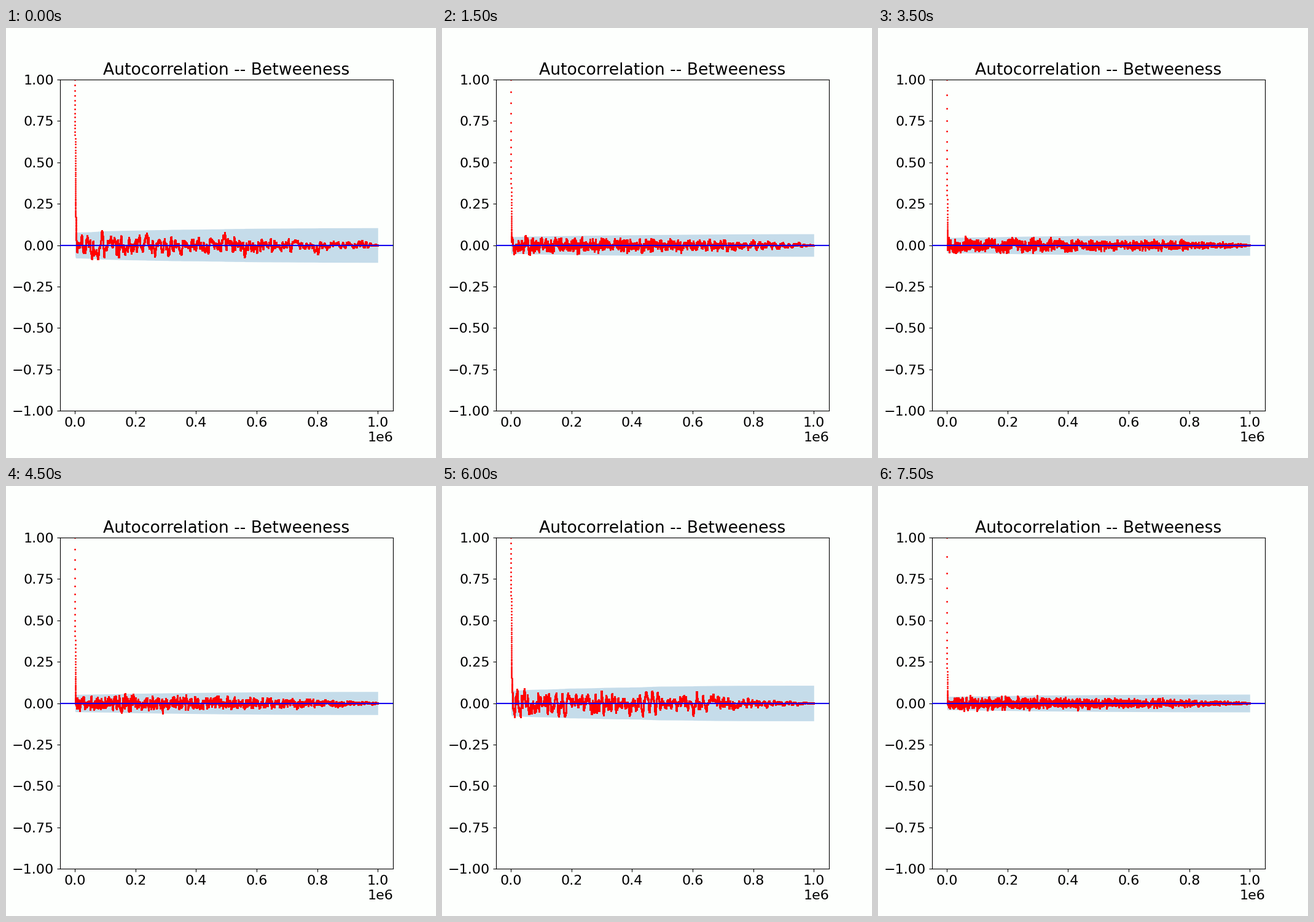
A matplotlib script for the animation above (8 s loop, 700x700 px).

```python
import numpy as np
import matplotlib.pyplot as plt
from matplotlib.animation import FuncAnimation

N = 20000            # samples per chain
STEP = 50            # iterations between samples
STRETCH = 0.98       # slightly slower than exponential decay
PAPER = "#fdfffd"

# Lag-one correlation of each chain
RHO = [0.966, 0.951, 0.943, 0.925, 0.958, 0.940, 0.921, 0.907,
       0.958, 0.931, 0.902, 0.887, 0.966, 0.926, 0.902, 0.885]

lags = np.arange(N)
x = lags * STEP


def sample_acf(rho, rng):
    """Autocorrelation of a simulated AR(1) chain at every lag."""
    warmup = 600
    noise = rng.standard_normal(N + warmup)
    chain = np.convolve(noise, rho ** np.arange(warmup))[warmup:N + warmup]
    chain -= chain.mean()
    power = np.abs(np.fft.rfft(chain, 2 * N)) ** 2
    acf = np.fft.irfft(power)[:N]
    return acf / acf[0]


def correlogram(rho, seed):
    """Smooth decay from 1 that hands over to sampling ripple."""
    ripple = sample_acf(rho, np.random.default_rng(seed)) - rho ** lags
    limit = 3 * np.sqrt((1 + rho ** 2) / (1 - rho ** 2) / N)
    ripple = limit * np.tanh(ripple / limit)
    decay = rho ** (lags ** STRETCH)
    return decay + ripple * (1 - decay)


def bartlett_band(acf):
    """Half width of the 95% band for lags 1 and up."""
    variance = (2 * np.cumsum(acf[:-1] ** 2) - 1) / N
    return 1.96 * np.sqrt(variance)


curves = [correlogram(rho, seed) for seed, rho in enumerate(RHO)]
bands = [bartlett_band(acf) for acf in curves]

plt.rcParams.update({"font.family": "DejaVu Sans", "font.size": 16})
fig, ax = plt.subplots(figsize=(7, 7), dpi=100, facecolor=PAPER)
ax.set_facecolor(PAPER)
ax.set_title("Autocorrelation -- Betweeness")
ax.set_xlim(-50000, 1050000)
ax.set_ylim(-1, 1)

band = ax.fill_between(x[1:], -bands[0], bands[0], color="#1f77b4",
                       alpha=0.25, linewidth=0)
dots, = ax.plot(x, curves[0], "o", color="red", markersize=1)
ax.axhline(0, color="#1400f0", linewidth=1.5, zorder=3)


def update(i):
    half = bands[i]
    upper = np.column_stack([x[1:], half])
    lower = np.column_stack([x[1:], -half])[::-1]
    band.set_verts([np.vstack([upper, lower])])
    dots.set_ydata(curves[i])
    return band, dots


anim = FuncAnimation(fig, update, frames=len(RHO), interval=500,
                     repeat=True, repeat_delay=0)
plt.show()
```
